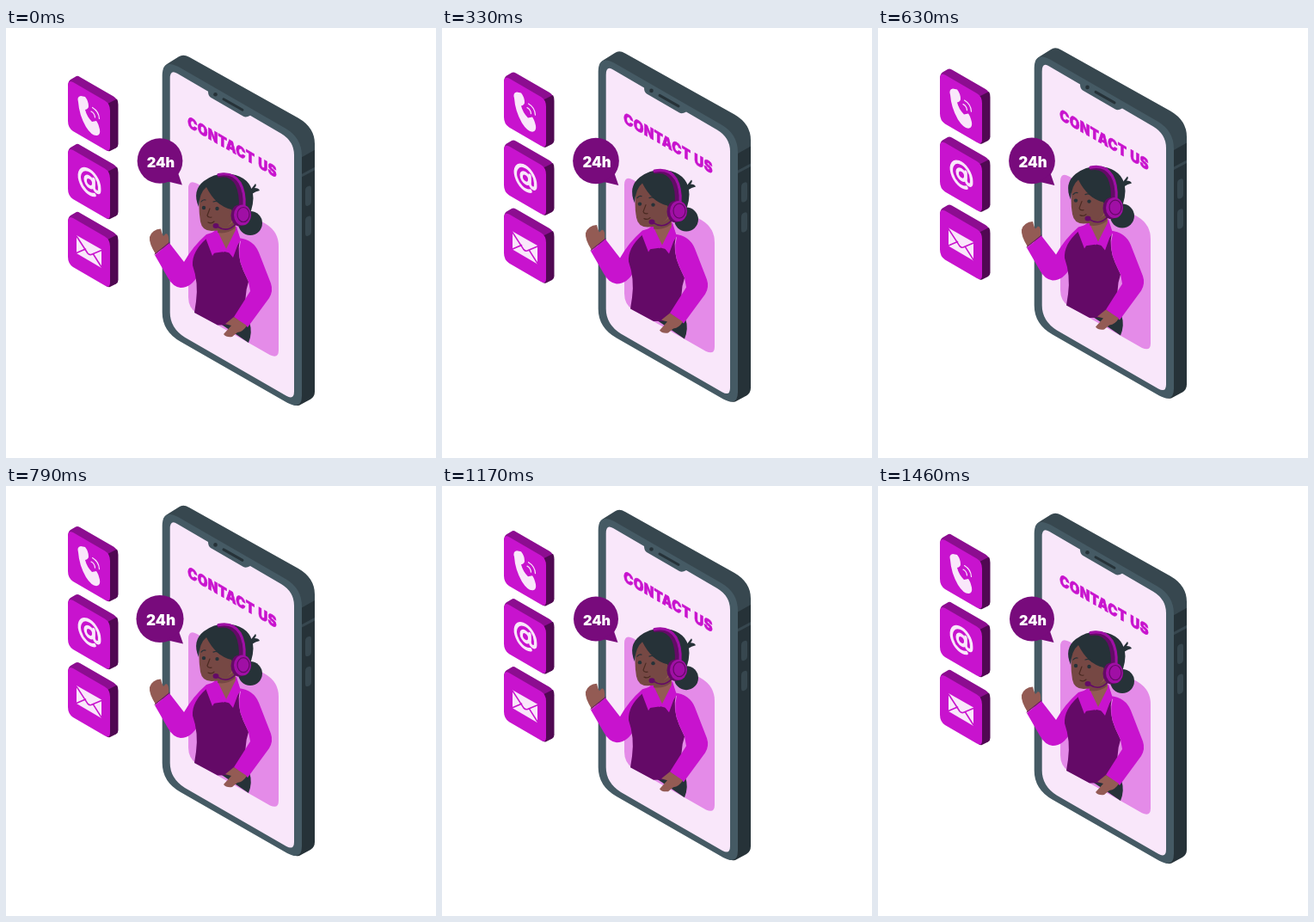
These frames come from a looping animation (500x500 px, 1.5 s). An HTML page:

```html
<!DOCTYPE html>
<html lang="en">
<head>
<meta charset="utf-8">
<title>Contact us</title>
<style>
  html, body { margin: 0; height: 100%; overflow: hidden; background: #fff; }
  svg { display: block; width: 100vw; height: 100vh; }
  text { font-family: Inter, "Open Sans", sans-serif; font-weight: 900; text-anchor: middle; }
  .main { fill: #c813ce; }
  .shade { fill: #a00fa5; }
  .deep { fill: #8c0d90; }
  .plum { fill: #640a67; }
  .dark { fill: #263238; }
  .slate { fill: #37474f; }
  .skin { fill: #764844; }
  .hand { fill: #935b54; }
  .light { fill: #f9e7fa; }
  .line { fill: none; stroke-linecap: round; stroke-linejoin: round; }
</style>
</head>
<body>
<svg viewBox="0 0 500 500">
  <defs>
    <g id="card">
      <path class="deep" d="M72 68Q72 62 75 60L81 56.500Q83 55 86 57L125 79.500Q130 83 130 88L121 100Z"/>
      <path fill="#500852" d="M118 88L129 82.500Q130.500 85 130.500 89V135Q130.500 138 128 139.500L121 143Q118 144 116 141Z"/>
      <path class="main" d="M72 68Q72 60 78 63L115 84.500Q121 88 121 96V138Q121 145 115 141.500L78 120Q72 116 72 108Z"/>
    </g>
  </defs>

  <g id="float">
    <g id="cards">
      <use href="#card"/>
      <use href="#card" y="79"/>
      <use href="#card" y="158"/>
      <path class="light" d="M84 86Q82 80 87 79L92 80Q96 85 96 91Q96 94 92 95Q94 103 100 109L105 108Q107 110 109 118Q110 124 106 125Q100 126 93 115Q85 101 84 86Z"/>
      <path class="line" stroke="#f9e7fa" stroke-width="1.200" d="M99 97Q103 99 103.500 104M100.500 92.500Q108 97 108.500 105.500"/>
      <g transform="matrix(.87 .5 0 1 97 179)" class="line" stroke="#f9e7fa" stroke-width="4">
        <circle r="5.500"/>
        <path d="M5.800 -6V3A3.800 3.800 0 0 0 13.400 3V0A13.400 13.400 0 1 0 7 11.500"/>
      </g>
      <path class="light" d="M82 241L111 257.500V279L82 262Z"/>
      <path class="line" stroke="#c813ce" stroke-width="1.600" d="M82 242L95 262Q97 264 99 263.500L111 258.500M82 261.500L92.500 257M111 278L101.500 263"/>
    </g>

    <g id="phone" transform="translate(0 .8)">
      <path class="slate" d="M183 47Q184 43 189 40L201 32.500Q206 29 213 33L340 104Q359 115 359 134V150L344 160L190 60Z"/>
      <path class="dark" d="M336 154L359 141V422Q359 428 354 431L341 438Q332 440 330 430Z"/>
      <path class="slate" d="M344 169L359 161V164.500L344 172.500Z"/>
      <path class="slate" d="M348 188Q348 184 352 183Q355 182 355 186V201Q355 205 351 206Q348 207 348 203ZM348 223Q348 219 352 218Q355 217 355 221V236Q355 240 351 241Q348 242 348 238Z"/>
      <path fill="#455a64" d="M181.700 54Q182 35 200 44L325 116Q344 127 344 148V427Q344 444 327 435L203 364Q181.700 352 181.700 330Z"/>
      <path class="light" d="M190.700 58Q190.700 47 199 52L235 73Q235 78 238 80L276 102Q279 104 284 101L320 122Q335 131 335 147V422Q335 432 326 427L208 359Q190.700 348 190.700 330Z"/>
      <circle class="dark" cx="243.500" cy="76.500" r="2.300"/>
      <path class="line" stroke="#263238" stroke-width="3" d="M253 82L275 94.500"/>
      <path fill="#e48be8" d="M212 186Q212 175 222 180L302 227Q317 236 317 253V374Q317 384 307 379.500L222 331Q212 325 212 312Z"/>
    </g>
    <text class="main" font-size="17.500" letter-spacing=".2" word-spacing="1" stroke="#c813ce" stroke-width=".6" transform="matrix(.866 .5 0 1 263 144.500)">CONTACT US</text>

    <g id="agent">
      <path class="dark" d="M282 191Q286 186 290 181Q292 183 289 186Q294 186 295 189Q290 190 286 193Z"/>
      <circle class="dark" cx="284" cy="227" r="14"/>
      <path class="dark" d="M245 341L283 342Q287 354 282 366Z"/>

      <path class="hand" d="M174 263Q166 250 167 243Q170 234 180 233.500Q181 239 183 242L186 239Q190 239 189 251Z"/>
      <path class="main" d="M173 264L190 250L207 272Q217 254 233 240L246 236L224 286Q216 302 203 302Q194 301 188 290Z"/>
      <path class="line" stroke="#640a67" stroke-width="1" d="M173 263L190 249.500"/>

      <path class="plum" d="M233 245Q216 260 217 276Q224 296 221 318L219 331L246 345.500L266 345L280 338Q276 312 282 295L276 282Q268 264 272 246L256 252Z"/>
      <path class="main" d="M270 244Q288 246 294 261L308 297Q311 306 306 314L281 348L265 336L284 306L282 295L276 282Q268 264 273 248Z"/>
      <path class="hand" d="M265 336L280 346Q276 353 269 354L263 359Q256 360 253 356L262 346L255 344Z"/>

      <path class="main" d="M233 244L246 234L268 231L273 247L262 262L254 260L240 262Z"/>
      <path class="hand" d="M245 229L267 222V240L256 258L244 240Z"/>
      <path class="main" d="M245 234L232 244L240 265L247 254L253 261L256 257L264 267L272 245L268 233L256 257Z"/>

      <path class="skin" d="M226 190Q223 208 226 225Q228 236 239 236Q253 236 261 227L270 212L250 185L235 178Z"/>
      <path class="skin" d="M247 231Q258 233 266 223V233Q257 240 246 238Z"/>
      <path class="dark" d="M224 208Q216 189 230 178Q246 166 267 171Q287 177 287.500 198Q287 213 279 224L265 217L262 211Q244 207 233 185Q225 191 224 208Z"/>
      <g class="line" stroke="#263238" stroke-width="1.200">
        <path d="M227 202Q229 199 232 200M241 202Q246 200 249 204"/>
        <path stroke="#4a2a22" d="M237 210L234 218Q235 221 239 220M235 226Q239 228 242 225"/>
      </g>
      <circle class="dark" cx="230" cy="209" r="2.200"/>
      <circle class="dark" cx="245.500" cy="210" r="2.200"/>

      <path class="line" stroke="#640a67" stroke-width="4.500" d="M248 171.500Q262 169 269 182Q274 193 273 208"/>
      <path class="line" stroke="#a00fa5" stroke-width="3.200" d="M247 170.500Q264 167 272 180Q278 191 277 207"/>
      <path class="line" stroke="#640a67" stroke-width="1.600" d="M268 227Q258 239 246 231"/>
      <ellipse class="plum" cx="244" cy="230" rx="3.500" ry="3"/>
      <ellipse class="plum" cx="271" cy="218" rx="9.500" ry="12.500"/>
      <ellipse class="shade" cx="275" cy="217.500" rx="10" ry="12"/>
      <ellipse class="shade" cx="276" cy="217" rx="7" ry="8.500" stroke="#640a67" stroke-width="1.200"/>
    </g>
  </g>

  <g id="bubble">
    <circle cx="179" cy="154.500" r="26" fill="#780b7c"/>
    <path fill="#780b7c" d="M200 169L204.500 182L187 178Z"/>
    <text x="180" y="161.500" font-size="16.200" fill="#fff">24h</text>
  </g>
</svg>
<script>
  const PERIOD = 1500, LEAD = 20, LIFT = 10;
  const float = document.getElementById("float");
  const bubble = document.getElementById("bubble");

  // Linear rise from a to b, fall from b to c
  const beat = (p, a, b, c) => Math.max(0, Math.min((p - a) / (b - a), (c - p) / (c - b)));

  function draw(now) {
    const p = ((now + LEAD) % PERIOD) / PERIOD;
    const y = 0.27 - LIFT * beat(p, 0, 0.5, 1);
    const scale = 1 + 0.1 * (beat(p, 0, 0.1, 0.3) + beat(p, 0.4, 0.5, 0.6));
    float.setAttribute("transform", `translate(0 ${y})`);
    bubble.setAttribute("transform", `translate(179 155) scale(${scale}) translate(-179 -155)`);
  }

  const start = performance.now();
  function tick() {
    draw(performance.now() - start);
    requestAnimationFrame(tick);
  }
  tick();
</script>
</body>
</html>
```
